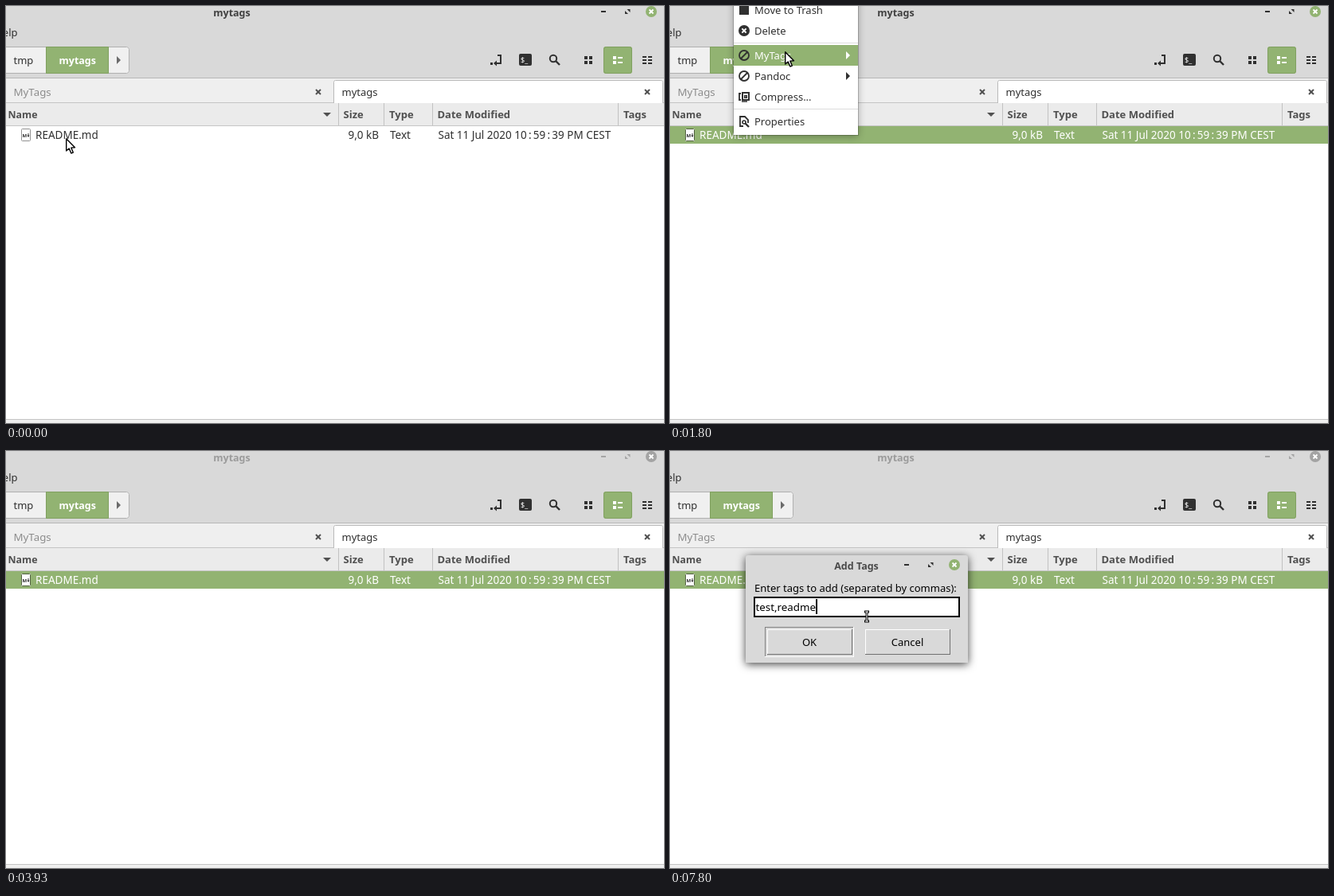
Write an HTML page with a canvas that moves like this. It is 826 by 524 pixels and loops after 8000 ms.

```html
<!DOCTYPE html>
<html lang="en">
<head>
<meta charset="utf-8">
<title>mytags</title>
<style>
html, body { margin: 0; width: 100%; height: 100%; overflow: hidden; background: #fff; }
canvas { display: block; }
</style>
</head>
<body>
<canvas id="stage" width="826" height="524"></canvas>
<script>
const g = document.getElementById('stage').getContext('2d');
const GREEN = '#92b372', INK = '#303030', BAR = '#d9d9d9';
const TICK = 1000 / 15, TICKS = 120;

// Pointer path: tick, x, y
const PATH = [
  [1, 75, 166], [2, 78, 161], [18, 78, 161], [19, 86, 158], [27, 144, 57], [29, 128, 60],
  [33, 128, 60], [40, 280, 66], [41, 274, 72], [43, 274, 72], [46, 370, 62], [50, 370, 62], [58, 330, 207]
];
const TYPED = 'test,readme';
const KEYS = [94, 95, 96, 97, 101, 108, 109, 111, 112, 115, 117];

const clamp = v => Math.max(0, Math.min(1, v));
const mix = (a, b, k) => a + (b - a) * k;
const grey = v => `rgb(${v},${v},${v})`;

function box(x, y, w, h, color) {
  g.fillStyle = color;
  g.fillRect(x, y, w, h);
}

function frame(x, y, w, h, color, line = 1) {
  g.strokeStyle = color;
  g.lineWidth = line;
  g.strokeRect(x + line / 2, y + line / 2, w - line, h - line);
}

function round(x, y, w, h, r, fill, border) {
  g.beginPath();
  g.roundRect(x, y, w, h, r);
  g.fillStyle = fill;
  g.fill();
  if (!border) return;
  g.beginPath();
  g.roundRect(x + .5, y + .5, w - 1, h - 1, r);
  g.strokeStyle = border;
  g.lineWidth = 1;
  g.stroke();
}

function text(s, x, y, color = INK, size = 13, weight = 400, align = 'left') {
  g.font = `${weight} ${size}px "Noto Sans", sans-serif`;
  g.textAlign = align;
  g.fillStyle = color;
  g.fillText(s, x, y);
}

function line(points, color, width = 2) {
  g.beginPath();
  points.forEach(p => g.lineTo(...p));
  g.strokeStyle = color;
  g.lineWidth = width;
  g.stroke();
}

function poly(points, color) {
  g.beginPath();
  points.forEach(p => g.lineTo(...p));
  g.closePath();
  g.fillStyle = color;
  g.fill();
}

function disc(x, y, r, color) {
  g.beginPath();
  g.arc(x, y, r, 0, 7);
  g.fillStyle = color;
  g.fill();
}

function ring(x, y, r, color, width) {
  g.beginPath();
  g.arc(x, y, r, 0, 7);
  g.strokeStyle = color;
  g.lineWidth = width;
  g.stroke();
}

function cross(x, y, r, color, width = 2) {
  line([[x - r, y - r], [x + r, y + r]], color, width);
  line([[x + r, y - r], [x - r, y + r]], color, width);
}

const rightArrow = (x, y, color) => poly([[x, y - 5], [x + 5, y], [x, y + 5]], color);

function windowButtons(x, y, color, close) {
  box(x - 63, y - 1, 6, 2, color);
  poly([[x - 29, y - 3], [x - 27, y - 3], [x - 27, y - 1]], color);
  poly([[x - 30.5, y - 3], [x - 26.5, y - 3], [x - 26.5, y + 1]], color);
  poly([[x - 33, y - 1], [x - 33, y + 3], [x - 29, y + 3]], color);
  disc(x, y, 7, close);
  cross(x, y, 2.5, '#fff', 1.8);
}

function toolbar() {
  round(-5, 51, 56, 34, 0, '#f0f0f0', '#b0b0b0');
  round(128, 51, 27, 34, [0, 3, 3, 0], '#f0f0f0', '#b0b0b0');
  round(50, 51, 79, 34, 0, GREEN, '#80a060');
  text('tmp', 9.5, 73);
  text('mytags', 66.5, 73, '#fff', 12.5, 700);
  rightArrow(139, 68, '#6a6a6a');

  box(608, 71, 3, 3, INK);
  line([[617, 62], [621, 62], [621, 72], [615, 72]], INK);
  poly([[612, 72], [616, 68.5], [616, 75.5]], INK);

  round(644, 60, 16, 15, 2, INK);
  text('$_', 646, 71, '#fff', 9);

  ring(687, 66, 4.2, INK, 2);
  line([[690, 69], [695, 74]], INK, 2.4);

  for (const x of [726, 732]) for (const y of [63, 69]) box(x, y, 4, 4, INK);

  round(750, 51, 36, 34, 3, GREEN, '#80a060');
  for (const y of [63, 69]) {
    box(762, y, 4, 4, '#fff');
    box(768, y + 1, 6, 2, '#fff');
  }
  for (const x of [799, 806]) for (const y of [63, 67, 71]) box(x, y, 5, 2, INK);
}

function fileView(selected) {
  box(0, 90, 826, 32, '#efefef');
  box(0, 90, 826, 1, '#b8b8b8');
  box(0, 121, 826, 1, '#c4c4c4');
  round(411, 93, 414, 31, [2, 2, 0, 0], '#fff', '#bababa');
  text('MyTags', 9.5, 113, '#8c8c8c', 13.3);
  text('mytags', 421.5, 113);
  cross(392, 108, 3, '#505050');
  cross(805, 108, 3, '#505050');

  box(0, 122, 826, 28, '#ebebeb');
  box(0, 150, 826, 1, '#c6c6c6');
  for (const x of [417, 474, 535, 768]) box(x, 122, 1, 28, '#c2c2c2');
  const heads = [['Name', 2.5], ['Size', 423.5], ['Type', 481], ['Date Modified', 541.5], ['Tags', 775]];
  for (const [s, x] of heads) text(s, x, 141, '#505050', s === 'Name' ? 12.4 : 13, 700);
  poly([[398, 134], [408, 134], [403, 139]], '#505050');

  if (selected) box(0, 151, 826, 22, GREEN);
  const color = selected ? '#fff' : INK;
  round(19, 154, 12, 16, 1, '#fff', selected ? '#50603e' : '#909090');
  text('M', 20.5, 165, INK, 6, 700);
  line([[28, 160], [28, 164]], INK, 1);
  poly([[26.5, 162.5], [29.5, 162.5], [28, 165]], INK);
  text('README.md', 37, 167, color, 13.5);
  text('9,0 kB', 468, 167, color, 13.5, 400, 'right');
  text('Text', 482, 167, color, 13.5);
  text('Sat 11 Jul 2020 10\u2009:\u200959\u2009:\u200939 PM CEST', 542.5, 167, color, 13.5);

  box(0, 519, 826, 1, '#c4c4c4');
  box(0, 520, 826, 4, '#efefef');
}

const icons = {
  trash(x, y) { box(x - 6, y - 6, 12, 12, INK); },
  remove(x, y) {
    disc(x, y, 7, INK);
    cross(x, y, 2.6, '#fff');
  },
  none(x, y) {
    ring(x, y, 6, INK, 1.8);
    line([[x - 4, y + 4], [x + 4, y - 4]], INK, 1.8);
  },
  compress(x, y) {
    frame(x - 3, y - 6, 10, 11, INK, 2);
    line([[x - 4, y - 4], [x - 6, y - 4], [x - 6, y + 4], [x - 4, y + 4]], INK, 1.8);
    frame(x, y - 2, 4, 4, INK, 1.5);
    line([[x - 3, y + 6], [x + 4, y + 6]], INK, 1.5);
  },
  properties(x, y) {
    line([[x - 1, y + 6], [x - 5, y + 6], [x - 5, y - 6], [x + 1, y - 6], [x + 5, y - 2], [x + 5, y + 2]], INK, 1.8);
    ring(x, y + 1, 2, INK, 1.6);
    line([[x + 1, y + 2], [x + 6, y + 7]], INK, 2.4);
  }
};

function menu(x, y, w, h, items, hot, alpha) {
  if (alpha <= 0) return;
  g.save();
  g.globalAlpha = alpha;
  g.shadowColor = 'rgba(0,0,0,.3)';
  g.shadowBlur = 9;
  g.shadowOffsetY = 2;
  box(x, y, w, h, '#fff');
  g.shadowColor = 'transparent';
  frame(x - 1, y - 1, w + 2, h + 2, 'rgba(0,0,0,.2)');
  for (const [label, mid, icon, sub] of items) {
    const on = label === hot;
    if (on) box(x, mid - 13, w, 26, GREEN);
    icons[icon](x + 13, mid);
    text(label, x + 26, mid + 5, on ? '#fff' : INK);
    if (sub) rightArrow(x + w - 15, mid, on ? '#fff' : INK);
  }
  g.restore();
}

const MAIN = [
  ['Move to Trash', 5, 'trash'], ['Delete', 31, 'remove'], ['MyTags', 62, 'none', 1],
  ['Pandoc', 88, 'none', 1], ['Compress...', 114, 'compress'], ['Properties', 145, 'properties']
];
const GROUPS = [['Tags', 62, 'none', 1], ['Files', 88, 'none', 1], ['Config', 114, 'none']];
const ACTIONS = [['AddTags', 62, 'none'], ['Remove', 88, 'none'], ['ReplaceTags', 114, 'none'], ['Remove All Tags', 140, 'none']];

function menus(n, [x, y]) {
  const out = clamp((54 - n) / 4);
  const shown = clamp((n - 9) / 4) * out;
  if (!shown) return;
  const under = n < 19 ? null : n < 28 ? MAIN.find(i => y >= i[1] - 13 && y < i[1] + 13) : MAIN[2];
  menu(80, -20, 156, 182, MAIN, under && under[0], shown);
  g.globalAlpha = shown;
  for (const line of [46, 129]) box(80, line, 156, 1, '#dcdcdc');
  g.globalAlpha = 1;
  menu(234, 45, 104, 86, GROUPS, n > 40 || x >= 234 ? 'Tags' : '', clamp((n - 27) / 2) * out);
  const third = n < 38 ? 0 : [.3, .65, .95][n - 38] || 1;
  menu(338, 45, 151, 112, ACTIONS, n >= 45 ? 'AddTags' : '', third * out);
}

function bevel(x, y, w, h, light, dark) {
  box(x, y, w, h, dark);
  box(x, y, w - 1, h - 1, light);
  box(x + 1, y + 1, w - 2, h - 2, BAR);
}

function dialog(n) {
  if (n < 70) return;
  g.save();
  g.globalAlpha = n === 70 ? .5 : 1;
  g.shadowColor = 'rgba(0,0,0,.75)';
  g.shadowBlur = 11;
  g.shadowOffsetY = 2;
  round(95, 131, 279, 135, [3, 3, 0, 0], BAR);
  g.shadowColor = 'transparent';
  text('Add Tags', 234, 149, '#4a4a4a', 12.5, 700, 'center');
  windowButtons(357, 143, INK, GREEN);
  text('Enter tags to add (separated by commas):', 106, 177, '#000');

  const focus = n >= 75;
  if (focus) {
    box(105, 183, 259, 26, '#000');
    box(107, 185, 255, 22, '#fff');
  } else {
    bevel(106, 184, 257, 24, '#828282', '#fff');
    box(107, 185, 255, 22, '#fff');
  }
  const typed = TYPED.slice(0, KEYS.filter(k => k <= n).length);
  text(typed, 107.5, 201, '#000', 13.33);
  // Caret: 600 ms on, 300 ms off
  if (focus && (n - 75) % 13.5 < 9) box(107 + Math.round(g.measureText(typed).width), 186, 2, 19, '#000');

  bevel(119, 221, 112, 38, '#828282', '#fff');
  bevel(122, 224, 107, 32, '#fff', '#707070');
  bevel(245, 224, 107, 32, '#fff', '#707070');
  text('OK', 175, 245, '#000', 13, 400, 'center');
  text('Cancel', 298, 245, '#000', 13, 400, 'center');
  g.restore();
}

function outlined(points, x, y) {
  g.save();
  g.translate(x, y);
  g.lineJoin = 'round';
  poly(points, '#fff');
  line([...points, points[0], points[1]], '#000', 1.4);
  g.restore();
}

const arrow = (x, y) =>
  outlined([[.7, .7], [.7, 16], [4.2, 12.9], [6.8, 19], [9.3, 18], [6.8, 12.1], [11.5, 11.8]], x, y);

function fist(x, y) {
  outlined([[1, 6], [3, 5], [3, 2], [5, 1], [7, 2], [9, 1], [11, 2], [13, 2], [15, 4],
    [15, 8], [13, 11], [13, 13], [5, 13], [5, 11], [1, 8]], x, y);
}

function beam(x, y) {
  for (const [color, width, e] of [['#000', 3, 1], ['#fff', 1, 0]]) {
    line([[x, y - 6], [x, y + 6]], color, width);
    for (const end of [-6, 6]) line([[x - 2 - e, y + end], [x + 2 + e, y + end]], color, width);
  }
}

function pointer(n) {
  const i = PATH.findIndex(p => p[0] >= n);
  if (i < 0) return PATH[PATH.length - 1].slice(1);
  const b = PATH[i], a = PATH[i - 1] || b;
  const k = a === b ? 0 : (n - a[0]) / (b[0] - a[0]);
  return [Math.round(mix(a[1], b[1], k)), Math.round(mix(a[2], b[2], k))];
}

function draw(n) {
  const at = pointer(n);
  const blur = clamp((n - 56) / 3);
  box(0, 0, 826, 524, '#fff');
  box(0, 0, 826, 91, BAR);
  text('mytags', 283.5, 13, grey(Math.round(mix(64, 155, blur))), 12.5, 700, 'center');
  windowButtons(810, 7, grey(Math.round(mix(48, 165, blur))), blur < .5 ? GREEN : '#a3a3a3');
  text('Help', 14.5, 38, INK, 13, 400, 'right');
  toolbar();
  fileView(n >= 10);
  menus(n, at);
  dialog(n);
  if (n < 59) arrow(...at);
  else if (n >= 77) beam(247, n < 83 ? 201 : 208);
  else if (n >= 75) arrow(247, n === 75 ? 165 : 183);
  else if (n >= 70) fist(241, 141);
}

const start = performance.now();
function loop() {
  const ms = performance.now() - start;
  draw(Math.floor((ms + 4) / TICK) % TICKS);
  requestAnimationFrame(loop);
}
loop();
</script>
</body>
</html>
```
